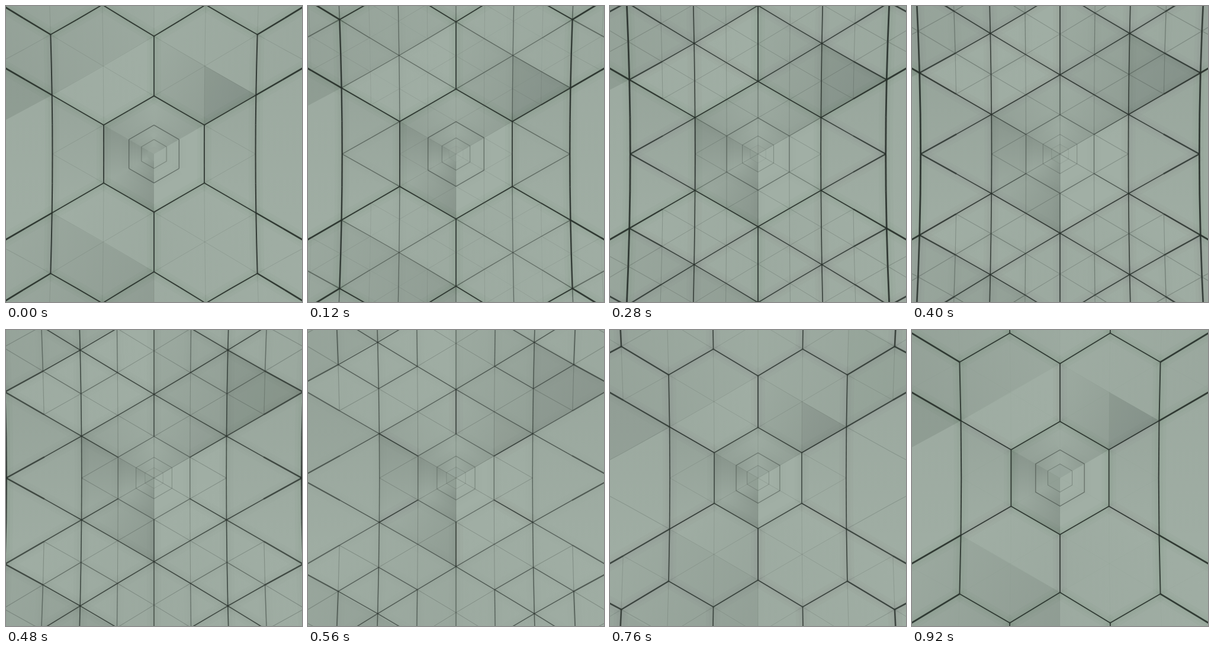
An HTML page with a canvas that plays this animation: 500x500 px, repeating every 960 ms.

```html
<!DOCTYPE html>
<html lang="en">
<head>
<meta charset="utf-8">
<title>Endless cubes</title>
<style>
  html, body { margin: 0; width: 100%; height: 100%; overflow: hidden; background: #a1afa5; }
  canvas { display: block; width: 500px; height: 500px; }
</style>
</head>
<body>
<canvas id="stage" width="500" height="500"></canvas>
<script>
const ctx = document.getElementById('stage').getContext('2d');
const H = Math.sqrt(3) / 2, EPS = 0.02;
const STEP = 40, FRAMES = 24;

// Sector tones, clockwise from the upper right, as a ring grows.
const CUBE = [.3, 0, 0, .5, .5, .3];
const FOLD = [.4, .15, .1, .1, .2, .05];
const OUTER = [.15, .1, .1, .4, .1, .3];

const mix = (a, b, t) => a + (b - a) * t;
const mid = (a, b) => [mix(a[0], b[0], .5), mix(a[1], b[1], .5)];
const corner = (k, r) => [r * Math.sin(k * Math.PI / 3), -r * Math.cos(k * Math.PI / 3)];

// Smooth step from 0 at a to 1 at b.
function ramp(a, b, x) {
  const t = Math.min(1, Math.max(0, (x - a) / (b - a)));
  return t * t * (3 - 2 * t);
}

// Line strengths at phase p of one doubling.
function strengths(p) {
  const leave = 1 - ramp(.35, .95, p);
  const hump = Math.sin(Math.PI * p);
  const halfEdge = ramp(0, 1, p);
  return {
    edge: leave,
    spoke: mix(.15, .9, ramp(0, .3, p)) * (1 - ramp(.45, .95, p)),
    halfEdge,
    halfSpoke: .28 * hump,
    coreHex: mix(.55, 1, ramp(.55, .95, p)),
    coreOuter: ramp(0, .6, p) * mix(.75, 1, p),
    coreInner: .28 * hump,
    side: ramp(.45, .9, p),
    small: .35 * mix(.55, 1, Math.abs(2 * p - 1)) + .2 * p,
    tiny: .33 * p
  };
}

// Slight pincushion lens around the centre.
function lens([x, y]) {
  const f = 1 + 4.8e-7 * (x * x + y * y);
  return [250 + x * f, 250 + y * f];
}

const ink = alpha => `rgba(38,46,41,${alpha})`;

function trace(pts) {
  ctx.beginPath();
  for (const p of pts) ctx.lineTo(...lens(p));
}

function shade(pts, fill) {
  trace(pts);
  ctx.closePath();
  ctx.fillStyle = fill;
  ctx.fill();
}

function stroke(pts, s, wide = 0) {
  if (s < .02) return;
  trace(pts);
  for (const w of [24, 14, 6]) {
    ctx.lineWidth = w;
    ctx.strokeStyle = ink(.018 * s * s);
    ctx.stroke();
  }
  ctx.lineWidth = .7 + 1.1 * s + wide;
  ctx.strokeStyle = ink(.9 * s);
  ctx.stroke();
}

// Each sector is darkest along its odd-numbered spoke.
function drawSector(k, r, tone) {
  const dark = k % 2 ? k : k + 1, light = k % 2 ? k + 1 : k;
  const g = ctx.createLinearGradient(...lens(corner(light, 1.5 * r)), ...lens(corner(dark, 1.5 * r)));
  g.addColorStop(0, ink(.12 * tone));
  g.addColorStop(1, ink(.38 * tone));
  shade([corner(k, r), corner(k, 2 * r), corner(k + 1, 2 * r), corner(k + 1, r)], g);
}

function drawRing(r) {
  const folded = ramp(60, 95, r), opened = ramp(130, 190, r);
  for (let k = 0; k < 6; k++) {
    drawSector(k, r, mix(mix(CUBE[k], FOLD[k], folded), OUTER[k], opened));
  }
  const flap = (k, v, tone) => shade(
    [mid(corner(k, 2 * r), corner(k + 1, 2 * r)), corner(v, 2 * r), corner(v, r)], ink(.28 * tone));
  flap(0, 1, .25 * folded * (1 - opened));
  flap(4, 5, .4 * opened);
}

function drawTones(u) {
  const r = u / 8;
  for (const k of [5, 1, 3]) {
    shade([[0, 0], corner(k, r), corner(k + 1, r), corner(k + 2, r)], ink(.25 * CUBE[k]));
  }
  for (let ring = r; ring < 400; ring *= 2) drawRing(ring);
}

const isHub = (i, j) => (i - j) % 3 === 0;

// Kind of the full-size edge that holds this half edge, if any.
function parentKind(i, j, di, dj) {
  const onLine = di === 0 ? i % 2 === 0 : dj === 0 ? j % 2 === 0 : (i + j) % 2 === 0;
  if (!onLine) return null;
  if (i % 2 || j % 2) { i -= di; j -= dj; }
  return isHub(i / 2, j / 2) || isHub(i / 2 + di, j / 2 + dj) ? 'spoke' : 'edge';
}

function strength(i, j, di, dj, v) {
  const x = Math.abs(i + di / 2) * H / 2;
  const y = Math.abs((i + di / 2) / 2 + j + dj / 2) / 2;
  const ray = x / Math.sqrt(3);
  // The left and right wedges outside a hexagon stay undivided.
  const inWedge = n => x > n * H + EPS && y < ray - EPS;
  const onWedge = n => (Math.abs(x - n * H) < EPS && y < n / 2) ||
    (x > n * H && Math.abs(y - ray) < EPS);
  const halfKind = isHub(i, j) || isHub(i + di, j + dj) ? 'halfSpoke' : 'halfEdge';
  const parent = parentKind(i, j, di, dj);
  const size = Math.max(x / H, y + ray);

  if (inWedge(2)) return 0;
  if (onWedge(2)) return 1;
  if (size < 1 - EPS) {
    if (parent) return size < .5 ? v.coreInner : v.coreOuter;
    return halfKind === 'halfEdge' ? v.coreHex : v.halfSpoke;
  }
  let s = parent ? v[parent] : 0;
  if (!inWedge(1)) s = Math.max(s, v[halfKind]);
  if (onWedge(1)) s = Math.max(s, v.side);
  return s;
}

function drawLines(u, v) {
  const a = u / 2, n = Math.ceil(300 / (a * H));
  const at = (i, j) => [i * H * a, (i / 2 + j) * a];
  for (let i = -n; i <= n; i++) {
    for (let j = -2 * n; j <= 2 * n; j++) {
      const p = at(i, j);
      if (Math.abs(p[1]) > 350) continue;
      for (const [di, dj] of [[1, 0], [0, 1], [-1, 1]]) {
        const q = at(i + di, j + dj);
        const s = strength(i, j, di, dj, v);
        stroke([p, q], s, s * ramp(150, 220, Math.abs(mid(p, q)[0])));
      }
    }
  }
  const hexagon = r => [0, 1, 2, 3, 4, 5, 6].map(k => corner(k, r));
  stroke(hexagon(u / 4), v.small);
  stroke(hexagon(u / 8), v.tiny);
}

function draw(frame) {
  // The loop has 25 phases; the second one is skipped.
  const p = (frame ? frame + 1 : 0) / 25;
  const u = 97.7 * 2 ** p;
  ctx.fillStyle = '#a1afa5';
  ctx.fillRect(0, 0, 500, 500);
  drawTones(u);
  drawLines(u, strengths(p));
}

let shown = -1;
function tick() {
  const frame = Math.floor(performance.now() / STEP) % FRAMES;
  if (frame !== shown) draw(shown = frame);
  requestAnimationFrame(tick);
}
tick();
</script>
</body>
</html>
```
